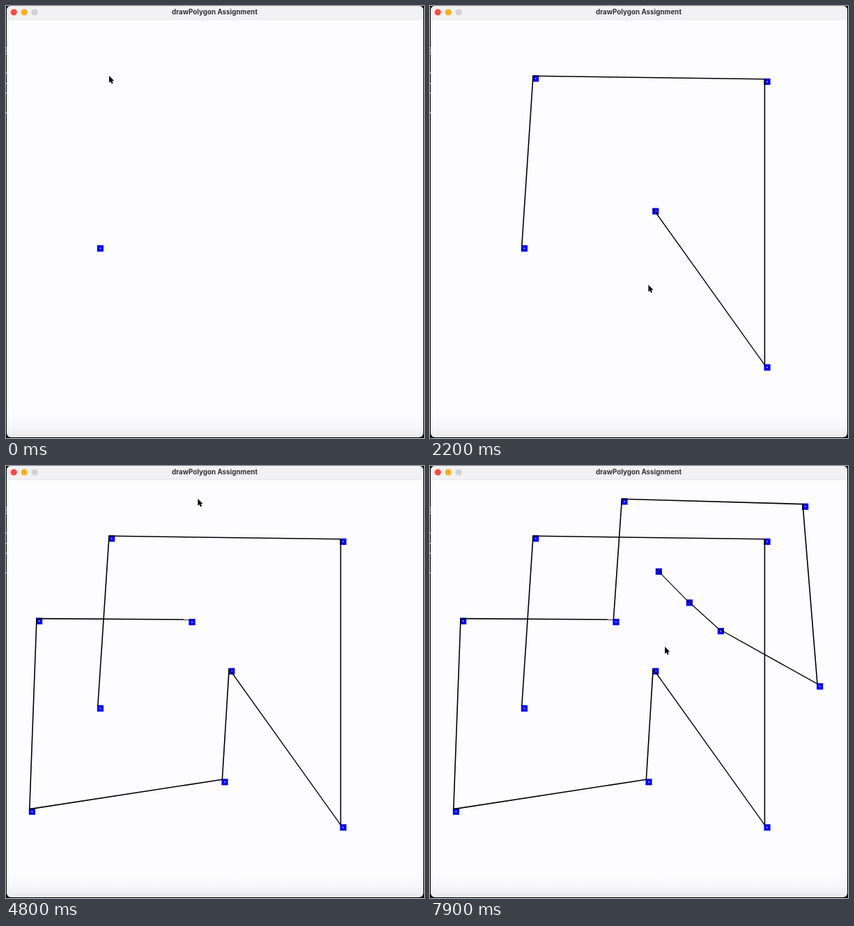
Recreate the animation shown at these times as an HTML page. Size 600 px wide and 619 px high, loop 8 s.

```html
<!DOCTYPE html>
<html lang="en">
<head>
<meta charset="utf-8">
<title>drawPolygon Assignment</title>
<style>
  html, body { margin: 0; width: 100%; height: 100%; overflow: hidden; background: #000; }
  svg { display: block; width: 600px; height: 619px; }
  .title { font: 700 9.8px Inter, sans-serif; fill: #333; text-anchor: middle; }
</style>
</head>
<body>
<svg viewBox="0 0 600 619" xmlns="http://www.w3.org/2000/svg">
  <defs>
    <linearGradient id="shade" x1="0" y1="0" x2="0" y2="1">
      <stop offset="0" stop-color="#fdfcfe"/>
      <stop offset=".5" stop-color="#f8f7f9"/>
      <stop offset="1" stop-color="#e9e8ea"/>
    </linearGradient>
    <clipPath id="window"><rect x="1" y="0" width="598" height="618" rx="6"/></clipPath>
  </defs>
  <rect width="600" height="619" fill="#000"/>
  <g clip-path="url(#window)">
    <rect width="600" height="585" fill="#fdfcfe"/>
    <rect y="585" width="600" height="34" fill="url(#shade)"/>
    <rect width="600" height="20" fill="#f2f1f3"/>
    <rect y="19.5" width="600" height=".7" fill="#e4e3e5"/>
  </g>
  <path d="M.5 59v12M.5 95v4m0 11v4m0 10v4m0 24v4" stroke="#999" stroke-dasharray="2"/>
  <circle cx="11.2" cy="9" r="4.6" fill="#fc4b48"/>
  <circle cx="26.2" cy="9" r="4.6" fill="#fdae24"/>
  <circle cx="41.2" cy="9" r="4.6" fill="#d2d1d3"/>
  <text class="title" x="299.5" y="12">drawPolygon Assignment</text>
  <g id="dots"></g>
  <g id="lines" stroke="#000"></g>
  <path id="cursor" d="M0 0V10.2L2.3 8.1L3.8 11.5L5.6 10.7L4.2 7.4H7.2Z" fill="#000" stroke="#fff" stroke-width="1.6" paint-order="stroke"/>
</svg>
<script>
const LOOP = 8000, STEP = 100;
const FIRST_CLICK = 100, CLICK_GAP = 610, HOLD = 100;
const LINE_WIDTH = 1.6, DOT_OFFSET = 3.6;

// Corners in click order.
const corners = [
  [131.8, 343.7], [148, 100.3], [480.4, 104.8], [480.4, 514.3], [320.2, 290.5],
  [310.4, 449.2], [33.8, 491.6], [44, 218.6], [263.4, 220], [275.4, 47.3],
  [535, 54.6], [556, 312.2], [413.8, 233], [368.8, 192.3], [324.8, 147.6]
];
const exit = [339, 276];

const byId = id => document.getElementById(id);
const distance = ([x0, y0], [x1, y1]) => Math.hypot(x1 - x0, y1 - y0);
const snap = t => Math.floor(t / STEP) * STEP;
const smooth = u => u * u * (3 - 2 * u);

function add(parent, tag, attributes) {
  const node = document.createElementNS("http://www.w3.org/2000/svg", tag);
  for (const name in attributes) node.setAttribute(name, attributes[name]);
  return parent.appendChild(node);
}

function addDot([x, y]) {
  const dot = add(byId("dots"), "g", { transform: `translate(${x + DOT_OFFSET} ${y + DOT_OFFSET})` });
  add(dot, "rect", { x: -4.6, y: -4.6, width: 9.2, height: 9.2, fill: "#0000f5" });
  add(dot, "rect", { x: -.8, y: -.8, width: 1.6, height: 1.6, fill: "#d8d8ff" });
  return dot;
}

// Thickness is measured along the minor axis, so diagonals look thinner.
function addLine([x1, y1], [x2, y2]) {
  const dx = x2 - x1, dy = y2 - y1;
  const slant = Math.max(Math.abs(dx), Math.abs(dy)) / Math.hypot(dx, dy);
  return add(byId("lines"), "line", { x1, y1, x2, y2, "stroke-width": LINE_WIDTH * slant });
}

// Clicks follow a steady beat; short hops come sooner.
let clock = FIRST_CLICK;
const clicks = corners.slice(1).map((point, i) => {
  if (i > 0) clock += Math.min(CLICK_GAP, 7 * distance(corners[i], point));
  const press = snap(clock);
  return { point, press, release: press + HOLD, dot: addDot(point), line: addLine(corners[i], point) };
});
addDot(corners[0]);

// The pointer rests while clicking, then glides to the next corner.
function pointerAt(t) {
  const next = clicks.findIndex(click => click.release > t);
  if (next === 0) return clicks[0].point;
  const last = clicks.at(next < 0 ? -1 : next - 1);
  const target = next < 0 ? exit : clicks[next].point;
  const limit = next < 0 ? LOOP : clicks[next].press;
  const travel = Math.min(limit - last.release, 2 * distance(last.point, target));
  const u = smooth(Math.min(1, (t - last.release) / travel));
  return last.point.map((from, axis) => from + (target[axis] - from) * u);
}

const show = (node, visible) => node.setAttribute("visibility", visible ? "visible" : "hidden");

function render(time) {
  const t = snap(time % LOOP);
  for (const { dot, line, press, release } of clicks) {
    show(dot, t >= press);
    show(line, t >= release);
  }
  const [x, y] = pointerAt(t);
  byId("cursor").setAttribute("transform", `translate(${x} ${y - .4})`);
}

const start = performance.now();
function frame() {
  render(performance.now() - start);
  requestAnimationFrame(frame);
}
frame();
</script>
</body>
</html>
```
